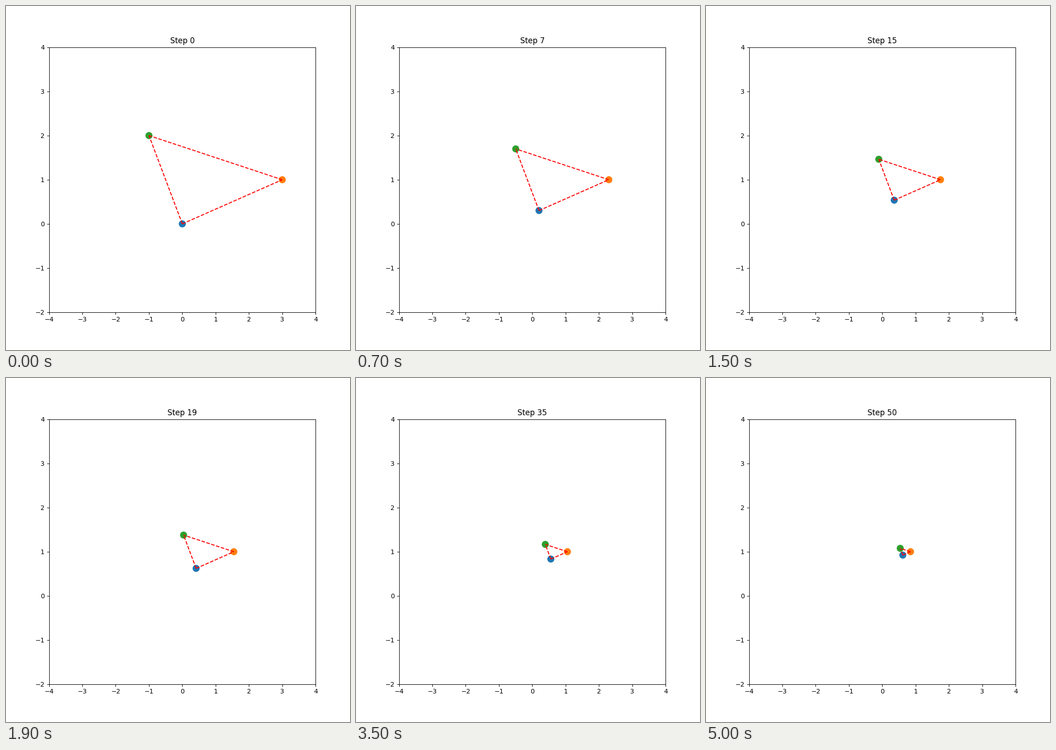
A matplotlib script that plays this animation: 748 by 748 pixels, repeating every 5.1 s.

```python
import itertools

import matplotlib.pyplot as plt
import numpy as np
from matplotlib.animation import FuncAnimation

STEPS = 51
INTERVAL = 100
DECAY = 0.95  # share of the distance to the centroid kept per step

START = np.array([(0, 0), (3, 1), (-1, 2)], dtype=float)
CENTER = START.mean(axis=0)
PAIRS = list(itertools.combinations(range(len(START)), 2))

fig, ax = plt.subplots(figsize=(7.48, 7.48), dpi=100)
ax.set_xlim(-4, 4)
ax.set_ylim(-2, 4)
title = ax.set_title("Step 0")

agents = ax.scatter(*START.T, s=100, c=["C0", "C1", "C2"])
links = [ax.plot([], [], "r--")[0] for _ in PAIRS]


def update(step):
    points = CENTER + (START - CENTER) * DECAY**step
    agents.set_offsets(points)
    for link, pair in zip(links, PAIRS):
        link.set_data(*points[list(pair)].T)
    title.set_text(f"Step {step}")
    return [agents, *links, title]


anim = FuncAnimation(fig, update, frames=STEPS, interval=INTERVAL,
                     repeat=True, repeat_delay=0)
plt.show()
```
